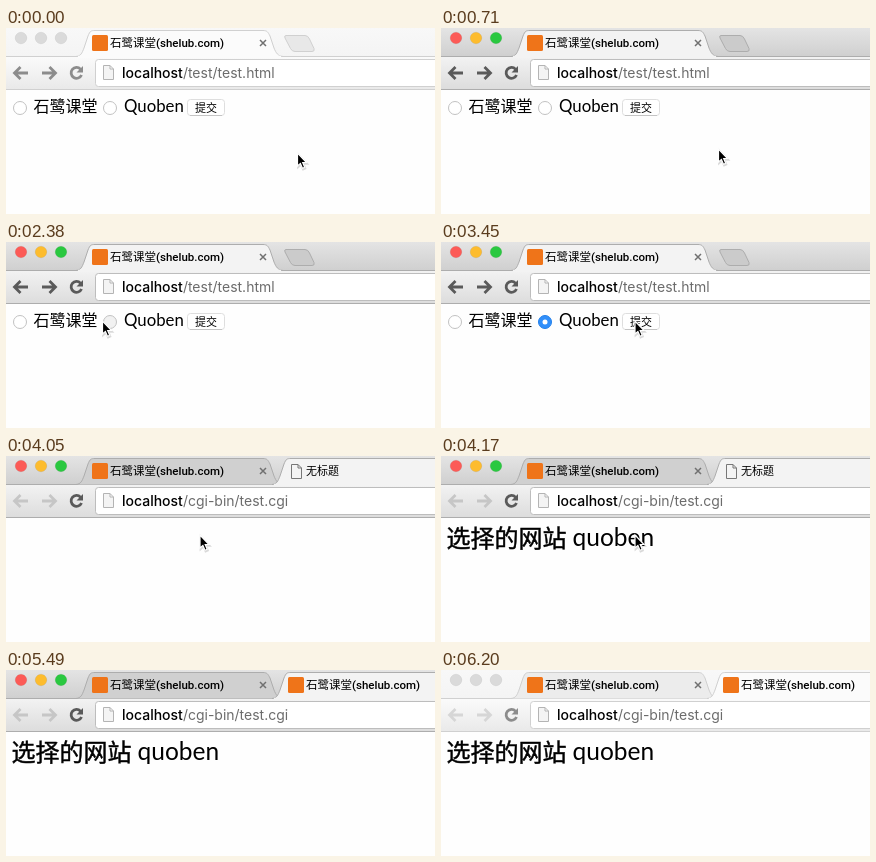
These frames come from a looping animation (429 by 186 pixels, 6.32 s). An HTML page:

```html
<!DOCTYPE html>
<html lang="zh">
<head>
<meta charset="utf-8">
<title>Radio form</title>
<style>
  html, body { margin: 0; width: 100%; height: 100%; overflow: hidden; background: #fefefe; }
  svg {
    display: block; width: 100%; height: 100%;
    --frame-top: #e4e4e4; --frame-low: #cfcfcf;
    --bar-top: #f3f3f3; --bar-low: #dcdcdc;
    --edge: #adadad; --back-tab: #d0d0d0; --plus: #cbcbcb;
    --icon: #5a5a5a; --faded: #c6c6c6; --field: #bdbdbd;
    --red: #fc5b57; --yellow: #fdbc2e; --green: #2ac840; --rim: rgba(0, 0, 0, .06);
  }
  svg.off {
    --frame-top: #f8f8f8; --frame-low: #f4f4f4;
    --bar-top: #fbfbfb; --bar-low: #e9e9e9;
    --edge: #d0d0d0; --back-tab: #ececec; --plus: #e8e8e8;
    --icon: #8c8c8c; --faded: #d6d6d6; --field: #d0d0d0;
    --red: #dadada; --yellow: #dadada; --green: #dadada;
  }
  text { fill: #000; font-family: Roboto, "Noto Sans CJK SC", "Noto Sans CJK", sans-serif; }
  .title { font-size: 11.5px; font-weight: 500; }
  .untitled .title { font-size: 11px; }
  .url { font-family: Inter, sans-serif; font-size: 14px; font-weight: 500; }
  .path { fill: #6c6c6c; font-weight: 400; }
  .label { font-size: 16px; }
  .word { font-family: Lato, sans-serif; font-size: 16.8px; }
  .result { font-size: 24px; stroke: #000; stroke-width: .45px; }
  .result-word { font-family: Lato, sans-serif; font-size: 24.5px; }
  .lights circle { stroke: var(--rim); }
  .icon { fill: none; stroke: var(--icon); stroke-width: 2.8; }
  .new .nav { stroke: var(--faded); }
  .tab { stroke: var(--edge); fill: var(--bar-top); }
  .new .first { fill: var(--back-tab); }
  .sheet { fill: #f4f4f4; stroke: #b4b4b4; }
  .untitled .sheet, .untitled use { stroke: #777; }
  .close { stroke: #707070; stroke-width: 1.5; }
  .radio { fill: #fff; stroke: #c2c2c2; }
  .held #choice { fill: #f1f1f1; }
  .fading #choice { fill: #9ac6fb; stroke: #86b4ec; }
  .chosen #choice { fill: #318ffa; stroke: #2380ea; }
  #dot { fill: #fff; opacity: 0; }
  .fading #dot, .chosen #dot { opacity: 1; }
  .button { fill: #fff; stroke: #dedede; }
  .button-base { stroke: #c4c4c4; }
  .button-text { font-size: 11px; }
  .pressed .button { fill: url(#blue); stroke: #2b78e0; }
  .pressed .button-text { fill: #fff; }
  .after, .new .before, .new .named, .blank .answer { display: none; }
  .new .after, .titled .named { display: inline; }
  .new.titled .named { display: inline; }
  .titled .untitled { display: none; }
</style>
</head>
<body>
<svg id="stage" class="off" viewBox="0 0 429 186">
  <defs>
    <linearGradient id="frame" x2="0" y2="1">
      <stop style="stop-color: var(--frame-top)"/>
      <stop offset="1" style="stop-color: var(--frame-low)"/>
    </linearGradient>
    <linearGradient id="bar" x2="0" y2="1">
      <stop style="stop-color: var(--bar-top)"/>
      <stop offset="1" style="stop-color: var(--bar-low)"/>
    </linearGradient>
    <linearGradient id="blue" x2="0" y2="1">
      <stop stop-color="#68b1fb"/>
      <stop offset="1" stop-color="#1a72f0"/>
    </linearGradient>
    <path id="tab" d="M70 28.5C75 28 76 25 78 20L82 8C84 3 85 2.5 89 2.5H257C261 2.5 262 4 264 8L268 20C270 25 272 28 277 28.5"/>
    <g id="site">
      <rect x="86" y="7" width="16" height="16" rx="1.5" fill="#ef7419"/>
      <text class="title" x="104" y="19">石鹭课堂(shelub.com)</text>
    </g>
    <path id="sheet" d="M.5 .5H7L10.5 4V14.5H.5ZM7 .5V4H10.5"/>
  </defs>

  <rect width="429" height="186" fill="#fefefe"/>

  <!-- browser frame -->
  <rect width="429" height="29" fill="url(#frame)"/>
  <rect y="28" width="429" height="34" fill="url(#bar)"/>
  <path d="M0 28.5H429M0 61.5H429" stroke="var(--edge)"/>
  <g class="lights">
    <circle cx="15" cy="10" r="5.8" fill="var(--red)"/>
    <circle cx="35" cy="10" r="5.8" fill="var(--yellow)"/>
    <circle cx="55" cy="10" r="5.8" fill="var(--green)"/>
  </g>
  <path class="before" d="M280 7.5H299Q302 7.5 303.5 11L308 20.5Q309 23.5 306 23.5H289Q286 23.5 284.5 20.5L279 10Q278 7.5 280 7.5Z" fill="var(--plus)" stroke="var(--edge)"/>
  <use href="#tab" class="tab first"/>
  <path class="before" d="M72 28.5H275" stroke="var(--bar-top)" stroke-width="1.4"/>
  <use href="#site"/>
  <path class="close" d="M254 12l6 6M260 12l-6 6"/>
  <g class="after">
    <use href="#tab" class="tab" x="196"/>
    <path d="M268 28.5H429" stroke="var(--bar-top)" stroke-width="1.4"/>
    <g class="untitled">
      <use href="#sheet" class="sheet" x="285" y="8"/>
      <text class="title" x="300" y="19">无标题</text>
    </g>
    <use href="#site" x="196" class="named"/>
  </g>

  <!-- toolbar -->
  <path class="icon nav" d="M22 45H9M14.5 39L8.5 45L14.5 51"/>
  <path class="icon nav" d="M36 45H49M43.5 39L49.5 45L43.5 51"/>
  <path class="icon" d="M74.5 41.2A5.4 5.4 0 1 0 75.5 47"/>
  <path d="M77 38V44.5H70.5Z" fill="var(--icon)"/>
  <rect x="89.5" y="31.5" width="350" height="27" rx="3" fill="#fff" stroke="var(--field)"/>
  <use href="#sheet" class="sheet" x="97" y="37"/>
  <text class="url" x="116" y="50">localhost<tspan class="path before">/test/test.html</tspan><tspan class="path after">/cgi-bin/test.cgi</tspan></text>

  <!-- form page -->
  <g class="before">
    <circle class="radio" cx="14" cy="80" r="6.5"/>
    <text class="label" x="27.5" y="84">石鹭课堂</text>
    <circle class="radio" id="choice" cx="104" cy="80" r="6.5"/>
    <circle id="dot" cx="104" cy="80" r="2.5"/>
    <text class="word" x="118" y="83.5">Quoben</text>
    <rect class="button" x="181.5" y="71.5" width="37" height="16" rx="3"/>
    <path class="button-base" d="M184 87.5H216"/>
    <text class="button-text" x="189" y="84">提交</text>
  </g>

  <!-- answer page -->
  <g class="after">
    <g class="answer">
      <text class="result" x="5.5" y="91">选择的网站</text>
      <text class="result-word" x="131.5" y="90">quoben</text>
    </g>
  </g>

  <g id="cursor">
    <path d="M0 0V13L2.9 10.4L5 15.2L7.2 14.2L5.2 9.5H9Z" fill="#000" stroke="#000" stroke-width="2" opacity=".14" transform="translate(.6 1.2)"/>
    <path d="M0 0V13L2.9 10.4L5 15.2L7.2 14.2L5.2 9.5H9Z" fill="#000" stroke="#fff" stroke-width="1.2"/>
  </g>
</svg>
<script>
  const LOOP = 6320;
  const stage = document.getElementById('stage');
  const cursor = document.getElementById('cursor');

  // time, x, y of the pointer tip; each place holds until the next
  const path = [
    [0, 291.5, 125], [120, 285.5, 125], [350, 280, 122.5], [470, 277.5, 121],
    [830, 262, 116], [950, 214, 101], [1070, 160, 90], [1190, 122, 85], [1310, 103, 83],
    [1430, 95, 81], [1550, 87, 78], [1670, 82, 73], [1790, 90, 76], [1900, 96.5, 79],
    [2860, 104, 81], [2980, 122, 83], [3100, 150, 82], [3220, 174, 80], [3340, 188, 78], [3450, 194, 79],
    [4530, 198, 81], [4650, 216, 88], [4770, 244, 98], [4890, 280, 110], [5010, 314, 119], [5130, 335, 125],
    [5250, 362, 141], [5370, 396, 164], [5490, 440, 200]
  ];

  // class, from, until
  const states = [
    ['off', 0, 710], ['off', 6200, LOOP],
    ['held', 2380, 2500], ['fading', 2500, 2620], ['chosen', 2620, LOOP],
    ['pressed', 3810, 4050], ['new', 4050, LOOP],
    ['blank', 4050, 4170], ['titled', 4290, LOOP]
  ];

  function draw(t) {
    const names = states.filter(([, from, to]) => t >= from && t < to).map(s => s[0]);
    stage.setAttribute('class', names.join(' '));
    const [, x, y] = path.filter(p => p[0] <= t).pop();
    cursor.setAttribute('transform', `translate(${x} ${y})`);
  }

  const start = performance.now();
  function tick() {
    draw((performance.now() - start) % LOOP);
    requestAnimationFrame(tick);
  }
  tick();
</script>
</body>
</html>
```
